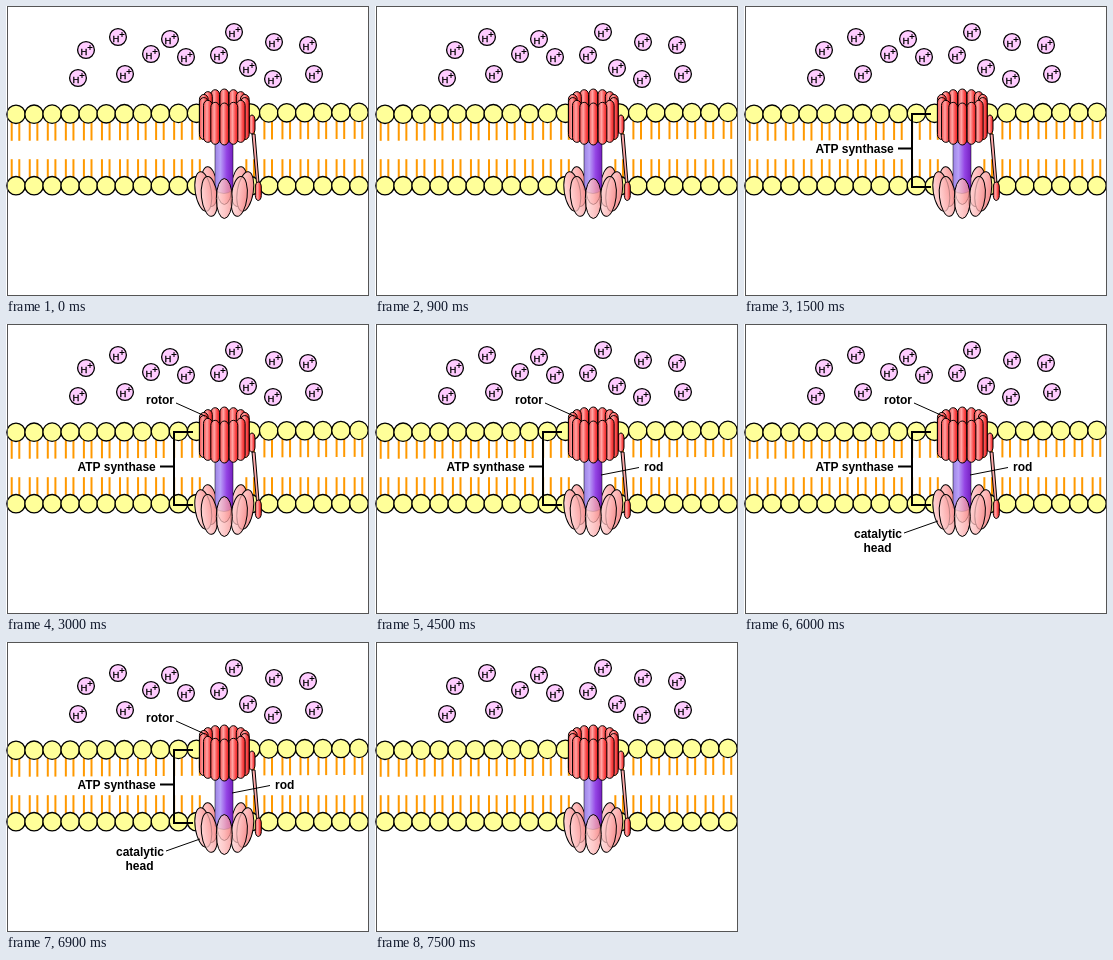
Recreate the animation shown at these times as an HTML page. Size 363 by 290 pixels, loop 8000 ms.

```html
<!DOCTYPE html>
<html lang="en">
<head>
<meta charset="utf-8">
<title>ATP synthase</title>
<style>
html, body { margin: 0; width: 100%; height: 100%; overflow: hidden; background: #fff; }
svg { display: block; width: 363px; height: 290px; }
text { font-family: "Liberation Sans", Arial, sans-serif; }
.label { font-weight: bold; font-size: 12px; }
.label path { fill: none; stroke: #000; }
</style>
</head>
<body>
<svg id="stage" viewBox="0 0 363 290">
  <defs>
    <linearGradient id="red">
      <stop offset="0" stop-color="#f04c4c"/><stop offset=".4" stop-color="#ffa4a4"/>
      <stop offset=".7" stop-color="#fa5050"/><stop offset="1" stop-color="#ec1c1c"/>
    </linearGradient>
    <linearGradient id="pink">
      <stop offset="0" stop-color="#ffd8d8"/><stop offset=".5" stop-color="#fdb8b8"/>
      <stop offset="1" stop-color="#f48c8c"/>
    </linearGradient>
    <linearGradient id="purple">
      <stop offset="0" stop-color="#9c84e4"/><stop offset=".3" stop-color="#b8a0f8"/>
      <stop offset=".65" stop-color="#9444e4"/><stop offset="1" stop-color="#7420c0"/>
    </linearGradient>
  </defs>
  <rect width="363" height="290" fill="#fff"/>
  <g id="membrane"></g>
  <g id="ions"></g>
  <g id="enzyme" stroke="#000"></g>
  <g class="label">
    <text x="71.5" y="147">ATP synthase</text>
    <path d="M154 142.5H168M187 108H168V181H187" stroke-width="2"/>
  </g>
  <g class="label">
    <text x="140" y="80">rotor</text>
    <path d="M170 79L199 92"/>
  </g>
  <g class="label">
    <text x="269" y="147">rod</text>
    <path d="M226 151L264 143.5"/>
  </g>
  <g class="label">
    <text x="110" y="214">catalytic</text>
    <text x="119.5" y="228">head</text>
    <path d="M160 209L194 197"/>
  </g>
  <rect x="1.5" y=".5" width="361" height="289" fill="none" stroke="#555"/>
</svg>
<script>
const SVG = "http://www.w3.org/2000/svg";
const membrane = document.getElementById("membrane");
const ions = document.getElementById("ions");
const enzyme = document.getElementById("enzyme");
const CENTER = 218.3;

function add(parent, tag, attributes, text = "") {
  const node = document.createElementNS(SVG, tag);
  for (const key in attributes) node.setAttribute(key, attributes[key]);
  node.textContent = text;
  parent.append(node);
}

function lipid(x, y, direction) {
  for (const dx of [-4.3, 3.3])
    add(membrane, "path", { d: `M${x + dx} ${y + 8 * direction}v${18.5 * direction}`, stroke: "#f90", "stroke-width": 2 });
  add(membrane, "circle", { cx: x, cy: y, r: 9.2, fill: "#ffff99", stroke: "#000", "stroke-width": 1.3 });
}

function ion(x, y) {
  add(ions, "circle", { cx: x, cy: y, r: 8.4, fill: "#fcf", stroke: "#000", "stroke-width": 1.3 });
  add(ions, "text", { x: x - 5.5, y: y + 4.8, "font-size": 9.5, stroke: "#000", "stroke-width": .3 }, "H");
  add(ions, "path", { d: `M${x + 1.5} ${y - 2.5}h5m-2.5 -2.5v5`, stroke: "#000" });
}

function capsule(x, y, width, height) {
  add(enzyme, "rect", { x: x - width / 2, y, width, height, rx: width / 2, ry: 5, fill: "url(#red)" });
}

function petal(side, depth) {
  const cx = CENTER + 21 * side, cy = 185.5 + 7 * depth;
  add(enzyme, "ellipse", {
    cx, cy, rx: 8, ry: 20, fill: "url(#pink)",
    "fill-opacity": depth > 0.5 ? .75 : 1,
    transform: `rotate(${9 * side} ${cx} ${cy})`
  });
}

// Places parts around a vertical axis; depth runs from -1 (back) to 1 (front).
function ring(count) {
  return Array.from({ length: count }, (_, k) => {
    const angle = 2 * Math.PI * k / count;
    return { side: Math.sin(angle), depth: Math.cos(angle) };
  }).sort((a, b) => a.depth - b.depth);
}

for (let i = 0; i < 20; i++) {
  if (i === 11 || i === 12) continue;
  const x = 10 + i * 18.05;
  lipid(x, 108.3 - i * .1, 1);
  lipid(x, 179.7, -1);
}

// Scattered ions, from left to right
for (const [x, y] of [[72, 72], [80, 44], [112, 31], [119, 68], [145, 48], [164, 33], [180, 51],
                      [213, 49], [228, 26], [242, 62], [267, 73], [268, 36], [302, 39], [308, 68]])
  ion(x, y);

// Stator
add(enzyme, "path", { d: "M246 128L250.5 177H253L249 128Z", fill: "#faa" });
capsule(246, 109, 6, 19);
capsule(252.3, 176, 6, 18.5);

// Catalytic head with the rod between its back and front petals
const petals = ring(8);
petals.filter(p => p.depth < .5).forEach(p => petal(p.side, p.depth));
add(enzyme, "path", { d: "M209 136H227V184Q218 191 209 184Z", fill: "url(#purple)", "stroke-width": .5 });
petals.filter(p => p.depth > .5).forEach(p => petal(p.side, p.depth));

// Rotor
for (const { side, depth } of ring(14))
  capsule(CENTER + 21 * side, 90 + 7 * depth, 8.8, 42);

const labels = document.querySelectorAll(".label");
function draw(now) {
  const time = now % 8000;
  labels.forEach((label, i) => {
    const visible = time >= 1500 * (i + 1) && time < 7500;
    label.setAttribute("visibility", visible ? "visible" : "hidden");
  });
  requestAnimationFrame(draw);
}
draw(0);
</script>
</body>
</html>
```
